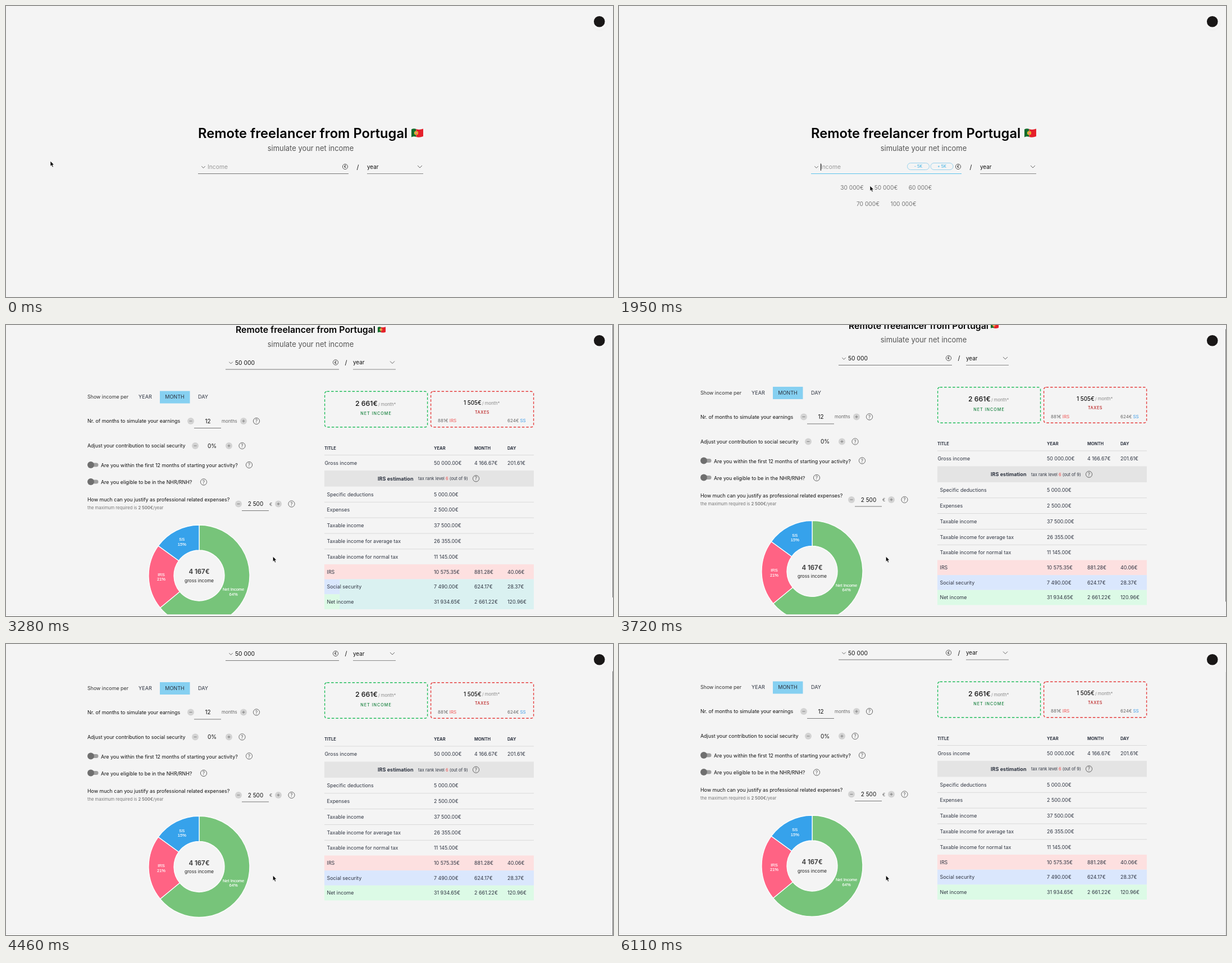
Recreate the animation shown at these times as an HTML page. Size 1081x518 px, loop 8000 ms.

```html
<!DOCTYPE html>
<html lang="en">
<head>
<meta charset="utf-8">
<title>Net income simulator</title>
<style>
  html, body { margin: 0; width: 100%; height: 100%; overflow: hidden; background: #f4f4f4; }
  svg { display: block; width: 1081px; height: 518px; font-family: Inter, sans-serif; white-space: pre; }
</style>
</head>
<body>
<svg id="stage" viewBox="0 0 1081 518"></svg>
<script>
const LOOP = 8000, TICK = 149;
const INK = '#2f3542', CHART = { x: 344, y: 446, outer: 90, inner: 45 };
const stage = document.getElementById('stage');
const clamp = v => Math.min(1, Math.max(0, v));
const smooth = v => { v = clamp(v); return v * v * (3 - 2 * v); };

// y is the middle of the capitals
const text = (x, y, str, size = 8.9, fill = '#111', attrs = '') =>
  `<text x="${x}" y="${y + size * .364}" font-size="${size}" fill="${fill}" ${attrs}>${str}</text>`;
const mid = (x, y, str, size, fill, attrs = '') => text(x, y, str, size, fill, 'text-anchor="middle" ' + attrs);
const rect = (x, y, w, h, fill, attrs = '') =>
  `<rect x="${x}" y="${y}" width="${w}" height="${h}" fill="${fill}" ${attrs}/>`;
const circle = (x, y, r, fill, attrs = '') => `<circle cx="${x}" cy="${y}" r="${r}" fill="${fill}" ${attrs}/>`;
const path = (d, stroke, width = 1, fill = 'none') =>
  `<path d="${d}" stroke="${stroke}" stroke-width="${width}" fill="${fill}"/>`;
const hline = (x1, x2, y, stroke = '#777', width = 1) => path(`M${x1} ${y}H${x2}`, stroke, width);
const chevron = (x, y, w) => path(`M${x - w} ${y - w / 2}l${w} ${w}l${w} ${-w}`, '#666');
const group = (x, y, body, scale = 1) => `<g transform="translate(${x} ${y}) scale(${scale})">${body}</g>`;

const help = (x, y) => circle(x, y, 5.6, 'none', 'stroke="#666"') + mid(x, y, '?', 8.5, '#555');
const knob = (x, y, plus) => circle(x, y, 6, '#d3d3d3') +
  path(`M${x - 2.5} ${y}h5` + (plus ? `M${x} ${y - 2.5}v5` : ''), '#777', .9);
const toggle = (y, label) => rect(147, y - 3.5, 17.5, 7, '#a0a0a0', 'rx="3.5"') + circle(151, y, 6, '#6f6f6f') +
  text(169, y + 1, label);

function flag(x, y, scale) {
  return group(x, y,
    path('M0 1.5Q4 -.5 8.5 1V15Q4 13.5 0 15.5Z', 'none', 0, '#146b2c') +
    path('M8.5 1Q14 3 21 .5V14Q14 17 8.5 15Z', 'none', 0, '#e5202b') +
    circle(8.5, 8, 3.6, '#e8c52f') + rect(6.9, 6, 3.2, 4, '#d8352f', 'rx="1"') + rect(7.7, 6.9, 1.6, 2, '#fff'),
    scale);
}

function heading(x, y, size, subY, flagX, flagY, flagScale) {
  return text(x, y, 'Remote freelancer from Portugal', size, '#000', 'font-weight="600"') +
    flag(flagX, flagY, flagScale) + mid(542.5, subY, 'simulate your net income', 12.95, '#555');
}

function incomeField(left, right, selLeft, selRight, y, value, color, active) {
  return chevron(left + 9.5, y + .8, 3.2) + text(left + 17, y + .5, value, 10.3, color) +
    circle(right - 6, y, 4.6, 'none', 'stroke="#555"') + mid(right - 6, y, '€', 6.5, '#333', 'font-weight="600"') +
    mid((right + selLeft) / 2, y + .5, '/', 11, '#111') + text(selLeft, y + .3, 'year', 9.9, '#111') +
    chevron(selRight - 6, y, 4) +
    hline(left, right, y + 12.5, active ? '#5cc3ec' : '#777') + hline(selLeft, selRight, y + 12.5, '#888');
}

function suggestions(opacity) {
  const items = [[431, 104, 30], [491.5, 104, 50], [552.5, 104, 60], [459.5, 133, 70], [522.5, 133, 100]];
  return `<g opacity="${opacity}">` + items.map(([x, y, k]) => mid(x, y, k + ' 000€', 10.2, '#777')).join('') + '</g>';
}

const pill = (x, w, label) => rect(x, 279.5, w, 12, 'none', 'rx="6" stroke="#8fcfec" stroke-width=".9"') +
  mid(x + w / 2, 285.6, label, 7.2, '#35aee4');

function home(n) {
  let out = heading(342, 226, 23.7, 253.5, 722, 218, 1) +
    incomeField(342, 610, 643, 743, 286, 'Income', '#999', n >= 8);
  if (n >= 4) out += pill(513.5, 39, '- 5K') + pill(555, 40, '+ 5K');
  if (n >= 8) out += path('M359.5 280.5V293', '#111');
  if (n >= 9) out += group(-16, 219.5, suggestions(clamp((n - 8) / 3)));
  return out;
}

function controls() {
  return text(145, 128, 'Show income per', 8.9, '#333') + text(236, 128, 'YEAR', 9.1, INK) +
    rect(274, 117.5, 53.5, 22, '#86d0f1') + mid(300.5, 128, 'MONTH', 9.1, INK) + text(342, 128, 'DAY', 9.1, INK) +
    text(145, 171, 'Nr. of months to simulate your earnings') + knob(329, 171) + mid(359.5, 171, '12', 10) +
    hline(335, 383, 183.5) + text(384, 171, 'months', 7.9, '#666') + knob(423, 171, true) + help(446, 171) +
    text(145, 215, 'Adjust your contribution to social security') + knob(337, 215) + mid(367, 215, '0%', 10) +
    knob(397, 215, true) + help(420.5, 215) +
    toggle(249, 'Are you within the first 12 months of starting your activity?') + help(433, 249) +
    toggle(279, 'Are you eligible to be in the NHR/RNH?') + help(352, 279.5) +
    text(145, 311, 'How much can you justify as professional related expenses?') +
    text(145, 325.5, 'the maximum required is <tspan font-weight="600">2 500€</tspan>/year', 7.6, '#777') +
    knob(414, 318.5) + mid(444.5, 318.5, '2 500', 10) + hline(420, 468, 330.5) + text(469, 319, '€', 8, '#666') +
    knob(485, 318.5, true) + help(508.5, 318.5);
}

function cards() {
  const card = (x, color) => rect(x, 118.3, 183, 63.5, 'none',
    `rx="4" stroke="${color}" stroke-width="1.4" stroke-dasharray="4.5 3"`);
  return card(567.6, '#22bd5c') + text(622, 139.5, '2 661€', 12.3, '#111', 'font-weight="500"') +
    text(663, 141, '/ month*', 7.6, '#888') +
    mid(659, 157.5, 'NET INCOME', 7.2, '#15803d', 'letter-spacing="1" font-weight="500"') +
    card(756.6, '#e53e3e') + text(815, 138.5, '1 505€', 9.9, '#111', 'font-weight="500"') +
    text(848, 139, '/ month*', 7.6, '#888') +
    mid(848, 155, 'TAXES', 7.2, '#b91c1c', 'letter-spacing=".6" font-weight="500"') +
    text(769, 170.5, '881€ <tspan fill="#f05252">IRS</tspan>', 8, '#666') +
    text(893, 170.5, '624€ <tspan fill="#3b9be8">SS</tspan>', 8, '#666');
}

function table(n) {
  const columns = [762, 834, 893];
  const row = (x, y, label, ...values) => text(x, y, label, 8.9, INK) +
    values.map((v, i) => text(columns[i], y, v, 8.9, INK)).join('');
  const head = [567, ...columns].map((x, i) =>
    text(x, 219, ['TITLE', 'YEAR', 'MONTH', 'DAY'][i], 7.5, INK, 'font-weight="700"')).join('');
  const plain = [['Specific deductions', '5 000.00€'], ['Expenses', '2 500.00€'], ['Taxable income', '37 500.00€'],
    ['Taxable income for average tax', '26 355.00€'], ['Taxable income for normal tax', '11 145.00€']];
  let out = head + hline(567, 940, 231.5, '#d9d9d9') +
    row(567.5, 245.5, 'Gross income', '50 000.00€', '4 166.67€', '201.61€') +
    rect(567, 259, 373, 28.5, '#e4e4e4') + text(662, 273.3, 'IRS estimation', 9.1, INK, 'font-weight="700"') +
    text(734, 273.5, 'tax rank level <tspan fill="#f05252">6</tspan> (out of 9)', 7.5, INK) + help(837, 273.3);
  plain.forEach((r, i) => {
    const y = 301.3 + 27.85 * i;
    out += row(571.5, y, ...r) + (i < 4 ? hline(567, 940, y + 14, '#d9d9d9') : '');
  });
  out += rect(567, 426, 373, 26.7, '#fde0e0') + rect(567, 452.7, 373, 26.6, '#dae7fd') +
    rect(567, 479.3, 373, 26.7, '#dcfae6');
  if (n < 24) {
    const x = n < 16 ? 567 : 594;
    out += rect(x, 452.7, 940 - x, 53.3, '#daf1f1');
  }
  return out + row(571.5, 439.5, 'IRS', '10 575.35€', '881.28€', '40.06€') +
    row(571.5, 466, 'Social security', '7 490.00€', '624.17€', '28.37€') +
    row(571.5, 492.5, 'Net income', '31 934.65€', '2 661.22€', '120.96€');
}

function donut(progress) {
  const { x, y, outer, inner } = CHART;
  const at = (a, r) => [x + r * Math.sin(a), y - r * Math.cos(a)];
  const font = 'font-family="Liberation Sans, Arial, sans-serif" stroke="#fff" stroke-width=".15"';
  let slices = '', labels = '', a = 0;
  for (const [name, pct, color] of [['Net Income', 64, '#77c47a'], ['IRS', 21, '#ff6384'], ['SS', 15, '#36a2eb']]) {
    const b = a + pct / 100 * progress * Math.PI * 2, big = b - a > Math.PI ? 1 : 0;
    slices += path(`M${at(a, outer)}A${outer} ${outer} 0 ${big} 1 ${at(b, outer)}L${at(b, inner)}` +
      `A${inner} ${inner} 0 ${big} 0 ${at(a, inner)}Z`, '#fff', 1.3, color);
    const [lx, ly] = at((a + b) / 2, 67.5);
    labels += mid(lx, ly - 4.2, name, 7.5, '#fff', font) + mid(lx, ly + 4.4, pct + '%', 7.5, '#fff', font);
    a = b;
  }
  return (progress > 0 ? slices + labels : '') + mid(x, 439, '4 167€', 11.3, '#444', 'font-weight="700"') +
    mid(x, 455, 'gross income', 8.2, '#222');
}

function scrollAt(n) {
  if (n < 24) return 0;
  if (n < 32) return 51.5 * (1 - Math.cos(Math.PI * (n - 23) / 8)) / 2;
  return n < 37 ? 52 : 51;
}

function results(n) {
  const scroll = scrollAt(n), progress = 1 - (1 - clamp(.2 + .149 * (n - 16))) ** 4;
  const page = heading(409, 8.5, 15.8, 34, 662, 3, .67) +
    incomeField(391, 593, 618, 694, 66.5, '50 000', '#111') +
    suggestions(clamp((18 - n) * .15)) + controls() + cards() + table(n) + donut(progress);
  return group(0, -scroll, page) + rect(0, 515.3, 1081, 3, '#fafafa') + hline(0, 1081, 515.5, '#e9e9e9', .8) +
    rect(1080, scroll * .98, 1, 485, n < 40 ? '#777' : '#e0e0e0');
}

function pointer(n) {
  let x, y, beam;
  if (n < 9) {
    const e = smooth(n / 5);
    x = 79 + 372 * e;
    y = 276 + 14 * e - 22 * Math.sin(Math.PI * e);
    beam = n >= 4;
  } else if (n < 17) {
    const e = smooth((n - 9) / 4);
    x = 451 - 4 * e;
    y = 290 + 30 * e;
    beam = n < 11 || n > 13;
  } else {
    const e = smooth((n - 16) / 5);
    x = 447 + 28.3 * e;
    y = 320 + 92 * e;
    beam = false;
  }
  const bar = 'M-2.2 -4.5Q0 -4.5 0 -3V3Q0 4.5 -2.2 4.5M2.2 -4.5Q0 -4.5 0 -3M0 3Q0 4.5 2.2 4.5M-1.2 1.5H1.2';
  return group(x, y, beam ? path(bar, '#fff', 2) + path(bar, '#111', .9)
    : path('M0 0V9.3L2.1 7.4L3.7 11L5.3 10.3L3.8 6.8H6.7Z', '#fff', .7, '#000'));
}

const badge = circle(1057, 29, 14.5, '#ececec', 'opacity=".5"') + circle(1057, 28, 14, '#f5f5f5') +
  circle(1056.7, 27.8, 9.8, '#191717');

const start = performance.now();
let shown = -1;
function frame() {
  const n = Math.floor(((performance.now() - start) % LOOP + 12) / TICK);
  if (n !== shown) {
    shown = n;
    stage.innerHTML = rect(0, 0, 1081, 518, '#f4f4f4') + (n < 14 ? home(n) : results(n)) + badge + pointer(n);
  }
  requestAnimationFrame(frame);
}
frame();
</script>
</body>
</html>
```
